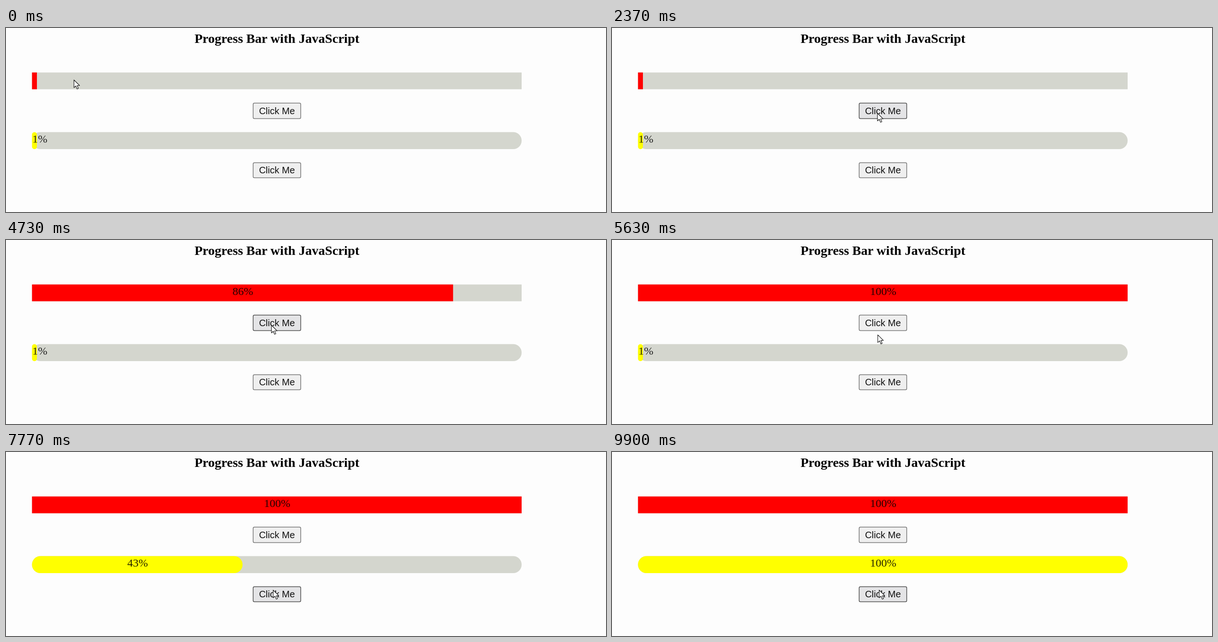
An HTML page for the animation above (9.93 s loop, 1280 by 395 pixels).

```html
<!DOCTYPE html>
<html lang="en">
<head>
<meta charset="utf-8">
<title>Progress Bar with JavaScript</title>
<style>
  html, body { margin: 0; width: 100%; height: 100%; overflow: hidden; background: #fdfdfd; }
  svg { display: block; width: 1280px; height: 395px; }
  text { text-anchor: middle; }
  .title { font: bold 28.08px "Liberation Serif", "Times New Roman", serif; }
  .percent { font: 24px "Liberation Serif", "Times New Roman", serif; fill-opacity: .86; }
  .track { fill: #d4d6ce; }
  .button rect { fill: #efefef; stroke: #777; stroke-width: 1.5; }
  .button text { font: 20px "Liberation Sans", Arial, sans-serif; fill: #111; }
  .button.hover rect { fill: #e4e4e6; stroke: #505050; }
</style>
</head>
<body>
<svg viewBox="0 0 1280 395">
  <text class="title" x="578" y="32">Progress Bar with JavaScript</text>

  <rect class="track" x="55.5" y="95.5" width="1044.5" height="36"/>
  <rect id="redBar" x="55.5" y="95.5" height="36" fill="#f00"/>
  <text id="redText" class="percent" y="118"></text>
  <g id="topButton" class="button">
    <rect x="527.3" y="161.3" width="101.4" height="33.2" rx="2.5"/>
    <text x="578" y="185">Click Me</text>
  </g>

  <rect class="track" x="55.5" y="223.5" width="1044.5" height="36.5" rx="18"/>
  <rect id="yellowBar" x="55.5" y="223.5" height="36.5" fill="#ff0"/>
  <text id="yellowText" class="percent" y="246"></text>
  <g id="bottomButton" class="button">
    <rect x="527.3" y="289.3" width="101.4" height="32.2" rx="2.5"/>
    <text x="578" y="312">Click Me</text>
  </g>

  <path id="cursor" d="M0 0V16.5L3.9 13L6.6 19.5L9.4 18.3L6.7 12H12Z"
        fill="#fff" stroke="#222" stroke-width="1.2" stroke-linejoin="round"/>
</svg>
<script>
const LOOP = 9930, STEP = 25, LEFT = 55.5, FULL = 1044.5;
const byId = id => document.getElementById(id);
const clamp = (v, lo, hi) => Math.min(hi, Math.max(lo, v));

const bars = [
  { bar: byId('redBar'), label: byId('redText'), start: 2600, radius: 0, showFirst: false },
  { bar: byId('yellowBar'), label: byId('yellowText'), start: 6712, radius: 18, showFirst: true },
];
const buttons = [
  { node: byId('topButton'), top: 161, bottom: 195 },
  { node: byId('bottomButton'), top: 289, bottom: 322 },
];
const rest = { x: 145, y: 111.5 };
const moves = [
  { from: 700, to: 1900, x: 566.3, y: 183 },
  { from: 5400, to: 6250, x: 570, y: 296.5 },
];

function cursorAt(t) {
  let { x, y } = rest;
  for (const move of moves) {
    const p = clamp((t - move.from) / (move.to - move.from), 0, 1);
    const eased = p * p * (3 - 2 * p);
    x += (move.x - x) * eased;
    y += (move.y - y) * eased;
  }
  return { x, y };
}

function drawBar({ bar, label, start, radius, showFirst }, t) {
  const percent = clamp(1 + Math.floor((t - start) / STEP), 1, 100);
  const width = FULL * percent / 100;
  bar.setAttribute('width', width);
  bar.setAttribute('rx', Math.min(radius, width / 2));
  label.textContent = percent > 1 || showFirst ? percent + '%' : '';
  // Text wider than its bar overflows to the right.
  const textWidth = label.getComputedTextLength();
  label.setAttribute('x', LEFT + 0.7 + Math.max(width, textWidth) / 2);
}

function draw() {
  const t = performance.now() % LOOP;
  bars.forEach(item => drawBar(item, t));
  const { x, y } = cursorAt(t);
  byId('cursor').setAttribute('transform', `translate(${x} ${y})`);
  for (const { node, top, bottom } of buttons) {
    node.classList.toggle('hover', x > 527 && x < 629 && y > top && y < bottom);
  }
  requestAnimationFrame(draw);
}
draw();
</script>
</body>
</html>
```
